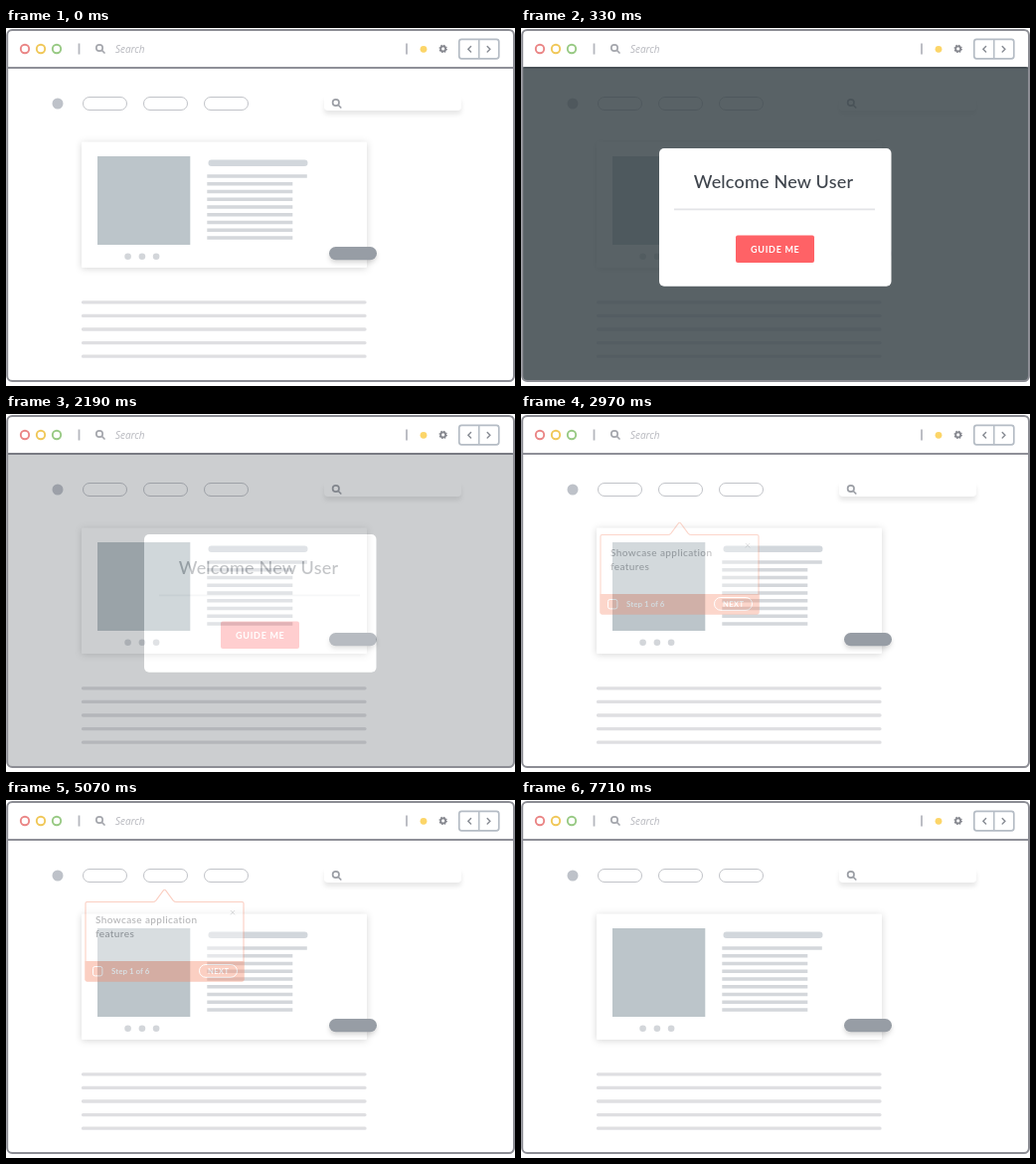
Write an HTML page that moves like this. It is 512x360 px and loops after 7800 ms.

```html
<!DOCTYPE html>
<html lang="en">
<head>
<meta charset="utf-8">
<title>Guided tour</title>
<style>
  html, body { margin: 0; width: 100%; height: 100%; overflow: hidden; background: #fff; }
  svg { display: block; width: 512px; height: 360px; }
  text { font-family: Lato, "Open Sans", sans-serif; }
  .line { fill: none; stroke-linecap: round; }
  .bars { stroke: #d4d7db; stroke-width: 3.5; fill: none; }
  .rules { stroke: #dfdfe2; stroke-width: 3.3; stroke-linecap: round; fill: none; }
  .pill { fill: #fff; stroke: #c1c3c8; }
  .field { fill: #fff; filter: drop-shadow(0 4px 2px rgba(0, 0, 0, .09)); }
  .card { fill: #fff; filter: drop-shadow(0 1px 3.5px rgba(0, 0, 0, .16)); }
  .action { fill: #979da5; filter: drop-shadow(0 3px 2px rgba(0, 0, 0, .14)); }
  .title { font-size: 18px; font-weight: 500; letter-spacing: .2px; fill: #3f454d; }
  .guide { font-size: 9px; font-weight: 700; letter-spacing: .7px; fill: #fff; }
  .copy { font-size: 10px; font-weight: 500; letter-spacing: .4px; fill: #4a4b50; }
  .step { font-size: 8px; font-weight: 700; fill: #fff; }
  .next { font-size: 7.5px; font-weight: 700; letter-spacing: .4px; fill: #fff; }

  .modal, .tip, .ripple { animation: 7800ms linear infinite both; }
  .ripple { fill: #fff; transform-box: fill-box; transform-origin: center; }
  .modal { animation-name: modal; }
  .tip1 { animation-name: tip1; }
  .tip2 { animation-name: tip2; }
  .move { animation: 7800ms cubic-bezier(.33, 0, .67, 1) infinite both; }
  .tip1 .move { animation-name: rise1; }
  .tip2 .move { animation-name: rise2; }
  .press1 { animation-name: press1; }
  .press2 { animation-name: press2; }
  .press3 { animation-name: press3; }

  @keyframes modal {
    0%, .25% { opacity: 0; }
    4.231%, 25.577% { opacity: 1; }
    29.231%, 100% { opacity: 0; }
  }
  @keyframes tip1 {
    0%, 38.076% { opacity: 0; }
    38.077% { opacity: .35; }
    41.5%, 62.885% { opacity: 1; }
    66.538%, 100% { opacity: 0; }
  }
  @keyframes tip2 {
    0%, 69.614% { opacity: 0; }
    69.615% { opacity: .35; }
    73.1%, 94.808% { opacity: 1; }
    98.846%, 100% { opacity: 0; }
  }
  @keyframes rise1 {
    0%, 38% { transform: translateY(19px); }
    45.385%, 100% { transform: none; }
  }
  @keyframes rise2 {
    0%, 69.615% { transform: translateY(19px); }
    78.846%, 100% { transform: none; }
  }
  @keyframes press1 {
    0%, 9.614% { opacity: 0; transform: scale(.04); }
    9.615% { opacity: 1; transform: scale(.04); }
    21.538%, 100% { opacity: 0; transform: none; }
  }
  @keyframes press2 {
    0%, 52.307% { opacity: 0; transform: scale(.07); }
    52.308% { opacity: 1; transform: scale(.07); }
    57.692%, 100% { opacity: 0; transform: none; }
  }
  @keyframes press3 {
    0%, 84.614% { opacity: 0; transform: scale(.07); }
    84.615% { opacity: 1; transform: scale(.07); }
    90%, 100% { opacity: 0; transform: none; }
  }
</style>
</head>
<body>
<svg viewBox="0 0 512 360">
  <defs>
    <clipPath id="guideClip"><rect x="216" y="208.5" width="79" height="27.5" rx="2"/></clipPath>
    <clipPath id="nextClip"><rect x="192.5" y="163.5" width="41.5" height="16.5" rx="8.2"/></clipPath>
    <clipPath id="actionClip"><rect x="325" y="220" width="48" height="13.3" rx="6.6"/></clipPath>
    <g id="lens" class="line" stroke-width="1.7">
      <circle r="3.2"/>
      <path d="M2.5 2.5L5 5"/>
    </g>
    <g id="tooltip">
      <path d="M81.5 102.5H147.5Q149.5 102.5 151 100.8L158 91.3Q159.5 89.3 161 91.3L168 100.8Q169.5 102.5 171.5 102.5H237.5Q239 102.5 239 104V180.5Q239 182 237.5 182H81.5Q80 182 80 180.5V104Q80 102.5 81.5 102.5Z" fill="#fff" stroke="#f58b6c" stroke-width="1.1"/>
      <path d="M79.5 162H239.5V180.5Q239.5 182.5 237.5 182.5H81.5Q79.5 182.5 79.5 180.5Z" fill="#f58b6c"/>
      <path d="M225.8 111l4.4 4.4M230.2 111l-4.4 4.4" stroke="#a3a5aa" stroke-width=".9"/>
      <rect x="87.5" y="167.5" width="9.4" height="9.4" rx="2" fill="none" stroke="#fff"/>
    </g>
  </defs>

  <!-- toolbar -->
  <g class="line" stroke-width="1.9">
    <circle cx="19" cy="21" r="4.2" stroke="#ea8585"/>
    <circle cx="35" cy="21" r="4.2" stroke="#f0c757"/>
    <circle cx="51" cy="21" r="4.2" stroke="#97c983"/>
  </g>
  <path d="M73.5 15.5v11M403 15.5v11" stroke="#b5b7be" stroke-width="1.8"/>
  <use href="#lens" x="94" y="20" stroke="#a5a7ad"/>
  <text x="110" y="24.7" font-size="10" font-style="italic" fill="#b7b8be" style="font-family:'Open Sans',sans-serif">Search</text>
  <circle cx="420" cy="21.3" r="3.4" fill="#fcd568"/>
  <g fill="none" stroke="#85878e">
    <circle cx="439.7" cy="20.9" r="2.5" stroke-width="1.8"/>
    <circle cx="439.7" cy="20.9" r="3.6" stroke-width="1.2" stroke-dasharray="1.414"/>
  </g>
  <rect x="455.8" y="11.3" width="40" height="19.5" rx="2.5" fill="none" stroke="#b5bcc5" stroke-width="1.7"/>
  <path d="M475.8 11v20" stroke="#b5bcc5" stroke-width="1.5"/>
  <path d="M467.6 18.5l-2.7 2.7 2.7 2.7M484.2 18.5l2.7 2.7-2.7 2.7" class="line" stroke="#878b93" stroke-width="1.4"/>
  <path d="M2 40h508" stroke="#8f9098" stroke-width="2.2"/>

  <!-- page -->
  <circle cx="52" cy="76" r="5.5" fill="#bec2c9"/>
  <g class="pill">
    <rect x="77.5" y="69.5" width="44" height="13" rx="6.5"/>
    <rect x="138.5" y="69.5" width="44" height="13" rx="6.5"/>
    <rect x="199.5" y="69.5" width="44" height="13" rx="6.5"/>
  </g>
  <rect class="field" x="320" y="68" width="138" height="15" rx="4"/>
  <use href="#lens" x="331.8" y="75" stroke="#9b9ea5"/>

  <rect class="card" x="76" y="114.5" width="287" height="126.5" rx="1"/>
  <rect x="92" y="129" width="93.3" height="89" fill="#bcc5ca"/>
  <g fill="#d3d6da">
    <circle cx="122.6" cy="229.8" r="3.3"/>
    <circle cx="136.9" cy="229.8" r="3.3"/>
    <circle cx="151.1" cy="229.8" r="3.3"/>
  </g>
  <rect x="203.5" y="132.5" width="100" height="6.5" rx="3.2" fill="#d2d7dc"/>
  <path class="bars" d="M202.3 149h100.5M202.3 156.8h86M202.3 164.5h86M202.3 172.2h86M202.3 180h86M202.3 187.7h86M202.3 195.5h86M202.3 203.2h86M202.3 211h86"/>
  <path class="rules" d="M77.5 275.8h283.5M77.5 289.4h283.5M77.5 303h283.5M77.5 316.6h283.5M77.5 330.2h283.5"/>
  <rect class="action" x="325" y="220" width="48" height="13.3" rx="6.6"/>
  <g clip-path="url(#actionClip)"><circle class="ripple press3" cx="348" cy="226.7" r="21"/></g>

  <!-- guided steps -->
  <g class="tip tip1">
    <g class="move">
      <use href="#tooltip"/>
      <text class="copy" x="90" y="124">Showcase application</text>
      <text class="copy" x="90" y="138">features</text>
      <text class="step" x="106" y="175">Step 1 of 6</text>
      <rect x="194.5" y="165.5" width="38" height="12.8" rx="6.4" fill="none" stroke="#fff"/>
      <text class="next" x="213.7" y="174.7" text-anchor="middle">NEXT</text>
      <g clip-path="url(#nextClip)"><circle class="ripple press2" cx="213.2" cy="171.8" r="21"/></g>
    </g>
  </g>
  <g class="tip tip2">
    <g class="move">
      <use href="#tooltip" x="191" y="147"/>
      <text class="copy" x="280" y="271">Guide them to take action</text>
      <text class="step" x="297" y="322">Step 2 of 6</text>
    </g>
  </g>

  <!-- welcome dialog -->
  <g class="modal">
    <rect x="1" y="39" width="509.5" height="315.5" rx="3" fill="#3a4549" fill-opacity=".84"/>
    <rect x="139" y="121" width="233.5" height="138.7" rx="5" fill="#fff"/>
    <text class="title" x="254" y="161" text-anchor="middle">Welcome New User</text>
    <path d="M154 182.3h202" stroke="#e3e4e7" stroke-width="1.8"/>
    <rect x="216" y="208.5" width="79" height="27.5" rx="2" fill="#ff6266"/>
    <text class="guide" x="255.8" y="225.5" text-anchor="middle">GUIDE ME</text>
    <g clip-path="url(#guideClip)"><circle class="ripple press1" cx="255.5" cy="222.3" r="41"/></g>
  </g>

  <rect x="1.2" y="2" width="509.8" height="353" rx="5" fill="none" stroke="#8c8d94" stroke-width="2"/>
</svg>
</body>
</html>
```
